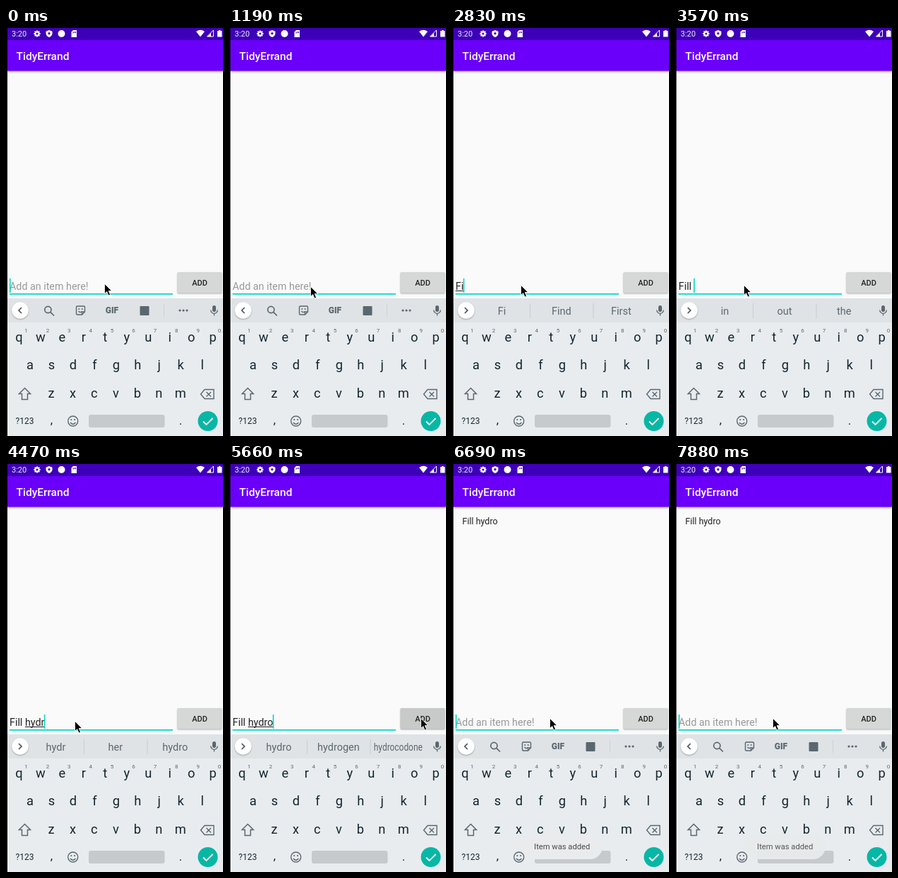
An HTML page with a canvas that plays this animation: 307x575 px, repeating every 8 s.

```html
<!DOCTYPE html>
<html lang="en">
<head>
<meta charset="utf-8">
<title>To-do list</title>
<style>
  html, body { margin: 0; width: 100%; height: 100%; overflow: hidden; background: #000; }
  canvas { display: block; }
</style>
</head>
<body>
<canvas id="stage" width="307" height="575"></canvas>
<script>
const ctx = document.getElementById('stage').getContext('2d');
const LOOP = 8000;
const TEAL = '#03dac5', GRAY = '#5b676f', INK = '#15262f';

// Step timelines: [start ms, ...values]
const pointer = [
  [0, 139, 360], [900, 132, 362], [1040, 120, 364], [1190, 115, 364],
  [1490, 111, 364], [1640, 101, 363], [1790, 97, 362],
  [5060, 108, 362], [5210, 160, 360], [5360, 232, 358], [5510, 268, 358],
  [5660, 271, 358], [5800, 238, 358], [5950, 150, 359], [6090, 139, 358], [6240, 138, 358]
];
const caret = [
  [0, 1], [150, 0], [600, 1], [1190, 0], [1640, 1], [2080, 0], [2680, 1],
  [5210, 0], [5660, 1], [6240, 0], [6690, 1], [7280, 0], [7730, 1]
];
// Text, then the suggestion strip ('' = empty strip, null = tool icons)
const typing = [
  [0, '', null],
  [2680, 'F', 'F For Find'], [2830, 'Fi', 'Fi Find First'],
  [3120, 'Fil', 'Fil File Fill'], [3270, 'Fill', 'Fill Filled Fills'],
  [3570, 'Fill ', 'in out the'],
  [3870, 'Fill h', 'h he have'], [4020, 'Fill hy', 'hy hey he'],
  [4170, 'Fill hyd', 'hyd had he'], [4470, 'Fill hydr', 'hydr her hydro'],
  [4620, 'Fill hydro', 'hydro hydrogen hydrocodone'],
  [5800, '', ''], [6090, '', null]
];
const toast = [[0, 0], [5800, .25], [5950, .6], [6090, .94], [6240, 1], [7730, .98], [7880, .93]];
const button = [[0, '#d6d7d7'], [5660, '#c8c9c9'], [5950, '#cdcecd'], [6090, '#d6d7d7']];

const at = (track, t) => track.filter(step => step[0] <= t).pop().slice(1);

function box(x, y, w, h, color, r = 0) {
  ctx.fillStyle = color;
  ctx.beginPath();
  ctx.roundRect(x, y, w, h, r);
  ctx.fill();
}
function disc(x, y, r, color) {
  box(x - r, y - r, 2 * r, 2 * r, color, r);
}
function text(str, x, y, size, color, align = 'left', weight = 400, max) {
  ctx.font = `${weight} ${size}px Roboto, sans-serif`;
  ctx.textAlign = align;
  ctx.fillStyle = color;
  ctx.fillText(str, x, y, max);
}
function fill(d, color) {
  ctx.fillStyle = color;
  ctx.fill(new Path2D(d), 'evenodd');
}
function line(d, color, width = 1.5) {
  ctx.strokeStyle = color;
  ctx.lineWidth = width;
  ctx.stroke(new Path2D(d));
}
function shadow(blur, dy, draw) {
  ctx.save();
  ctx.shadowColor = 'rgba(0,0,0,.3)';
  ctx.shadowBlur = blur;
  ctx.shadowOffsetY = dy;
  draw();
  ctx.restore();
}

function drawHeader() {
  box(2, 0, 305, 575, '#fafafa');
  shadow(3, 1, () => box(2, 17, 305, 43.5, '#6a00fa'));
  box(2, 0, 305, 17, '#3d00b8');
  text('TidyErrand', 14.5, 45, 15.5, '#fff', 'left', 500);

  text('3:20', 8, 12, 11, '#eee');
  for (let i = 0; i < 4; i++) {
    const a = i * Math.PI / 4, dx = 4.6 * Math.cos(a), dy = 4.6 * Math.sin(a);
    line(`M${44 - dx} ${8 - dy}L${44 + dx} ${8 + dy}`, '#fff', 2);
  }
  disc(44, 8, 3.5, '#fff');
  disc(44, 8, 1.5, '#3d00b8');
  fill('M61 3L65.5 4.7V8Q65 11.5 61 13Q57 11.5 56.5 8V4.7Z', '#fff');
  disc(61, 7.7, 1.6, '#3d00b8');
  disc(78.5, 8, 5, '#fff');
  fill('M95 3H100V13H92.5V5.5Z M94.5 5.5H95.5V7.5H94.5Z M96.3 5H97.3V7H96.3Z M98 5H99V7H98Z', '#fff');
  fill('M269 5Q275 .5 281 5L275 12.5Z', '#fff');
  line('M284.5 12L293.5 3V12Z', '#fff', 1);
  fill('M285 12L290 7V12Z', '#fff');
  fill('M299 4H301V3H303.5V4H305.5V12.5H299Z', '#fff');
}

function drawInput(t, value) {
  if (value) {
    text(value, 5, 368.5, 14.3, '#222');
    const word = value.split(' ').pop();
    const end = ctx.measureText(value).width, w = ctx.measureText(word).width;
    if (word) box(5 + end - w, 370, w, 1, '#222');
  } else {
    text('Add an item here!', 5, 368.5, 14.3, '#999');
  }
  const caretX = value ? 4.5 + ctx.measureText(value).width : 5;
  box(5, 374, 231, 1.8, TEAL);
  if (at(caret, t)[0]) box(caretX, 353, 1.6, 20, TEAL);

  shadow(2, 1, () => box(242.5, 344, 63, 29.5, at(button, t)[0], 1.5));
  text('ADD', 274, 362.7, 11, '#222', 'center', 500);
}

function drawTools() {
  line('M64 397A4.6 4.6 0 1 1 54.8 397A4.6 4.6 0 1 1 64 397M62.8 400.4L68 405.5', GRAY, 1.7);
  line('M101 392H110Q111.5 392 111.5 393.5V400L107.5 404H101Q99.5 404 99.5 402.5V393.5Q99.5 392 101 392M111.5 400H107.5V404M102.5 399Q105 402 107 399.5', GRAY, 1.4);
  disc(103.3, 396, 1, GRAY);
  disc(107.7, 396, 1, GRAY);
  text('GIF', 150, 402.3, 12, GRAY, 'center', 900);
  box(189.5, 392, 13, 13, GRAY, 1);
  box(223, 389, 1, 18, '#cdd2d6');
  for (const x of [246, 251, 256]) disc(x, 398, 1.6, GRAY);
}

function drawStrip(words) {
  box(2, 381, 305, 34.5, '#dfe3e6');
  shadow(2, 1, () => disc(20, 398, 11.8, '#fff'));
  line(words === null ? 'M22 394L18 398L22 402' : 'M18 394L22 398L18 402', '#444f56', 1.6);
  if (words === null) drawTools();
  else if (words) {
    words.split(' ').forEach((word, i) => text(word, 70.5 + 84.4 * i, 403.5, 14.5, GRAY, 'center', 400, 69));
    box(110, 388, 1, 21, '#c9ced2');
    box(199.5, 388, 1, 21, '#c9ced2');
  }
  box(292, 391, 5, 9, GRAY, 2.5);
  line('M289.7 397.5A4.8 4.8 0 0 0 299.3 397.5M294.5 402V405.5', GRAY, 1.3);
}

function drawKeyboard() {
  box(2, 415, 305, 160, '#e8ecef');
  const rows = [['qwertyuiop', 18.5, 442], ['asdfghjkl', 34, 481], ['zxcvbnm', 64, 521]];
  for (const [keys, x, y] of rows)
    [...keys].forEach((key, i) => text(key, x + 30.45 * i, y, 18.3, INK, 'center'));
  for (let i = 0; i < 10; i++) text((i + 1) % 10, 28.5 + 30.4 * i, 429, 8, GRAY, 'center');

  line('M26.5 507.5L34.5 515.5H30.5V523.5H22.5V515.5H18.5Z', GRAY, 1.5);
  line('M281 509.5H294V522.5H281L275.5 516ZM283.5 513L290 519.5M290 513L283.5 519.5', GRAY, 1.4);
  text('?123', 26.5, 558, 12, INK, 'center');
  text(',', 64.5, 558, 17, INK, 'center');
  text('.', 247, 559, 17, INK, 'center');
  line('M101.7 554A7 7 0 1 1 87.7 554A7 7 0 1 1 101.7 554M91 556Q94.7 560.5 98.4 556', GRAY, 1.4);
  disc(92.3, 552, 1.1, GRAY);
  disc(97.1, 552, 1.1, GRAY);
  box(117, 545, 107.5, 18, '#c6cacd', 3);
  disc(285.5, 554, 14, '#07b7a5');
  line('M279 554.5L283.5 559L292.5 550', '#fff', 1.8);
}

function drawToast(alpha) {
  ctx.globalAlpha = alpha;
  box(98, 521, 115, 36, '#e9ebec', 18);
  text('Item was added', 155.7, 542.7, 11.2, '#4a4a4a', 'center');
  ctx.globalAlpha = 1;
}

function drawPointer(x, y) {
  ctx.save();
  ctx.translate(x, y);
  const arrow = 'M.5 .5V14.5L3.7 11.5L6 17L8.5 16L6.2 10.6H10.6Z';
  fill(arrow, '#000');
  line(arrow, '#fff', .8);
  ctx.restore();
}

function frame(now) {
  const t = now % LOOP;
  const [value, words] = at(typing, t);
  ctx.fillStyle = '#000';
  ctx.fillRect(0, 0, 307, 575);
  drawHeader();
  if (t >= 5800) text('Fill hydro', 14.5, 84.5, 12.5, '#222');
  drawInput(t, value);
  drawStrip(words);
  drawKeyboard();
  drawToast(at(toast, t)[0]);
  drawPointer(...at(pointer, t));
  requestAnimationFrame(frame);
}
requestAnimationFrame(frame);
</script>
</body>
</html>
```
